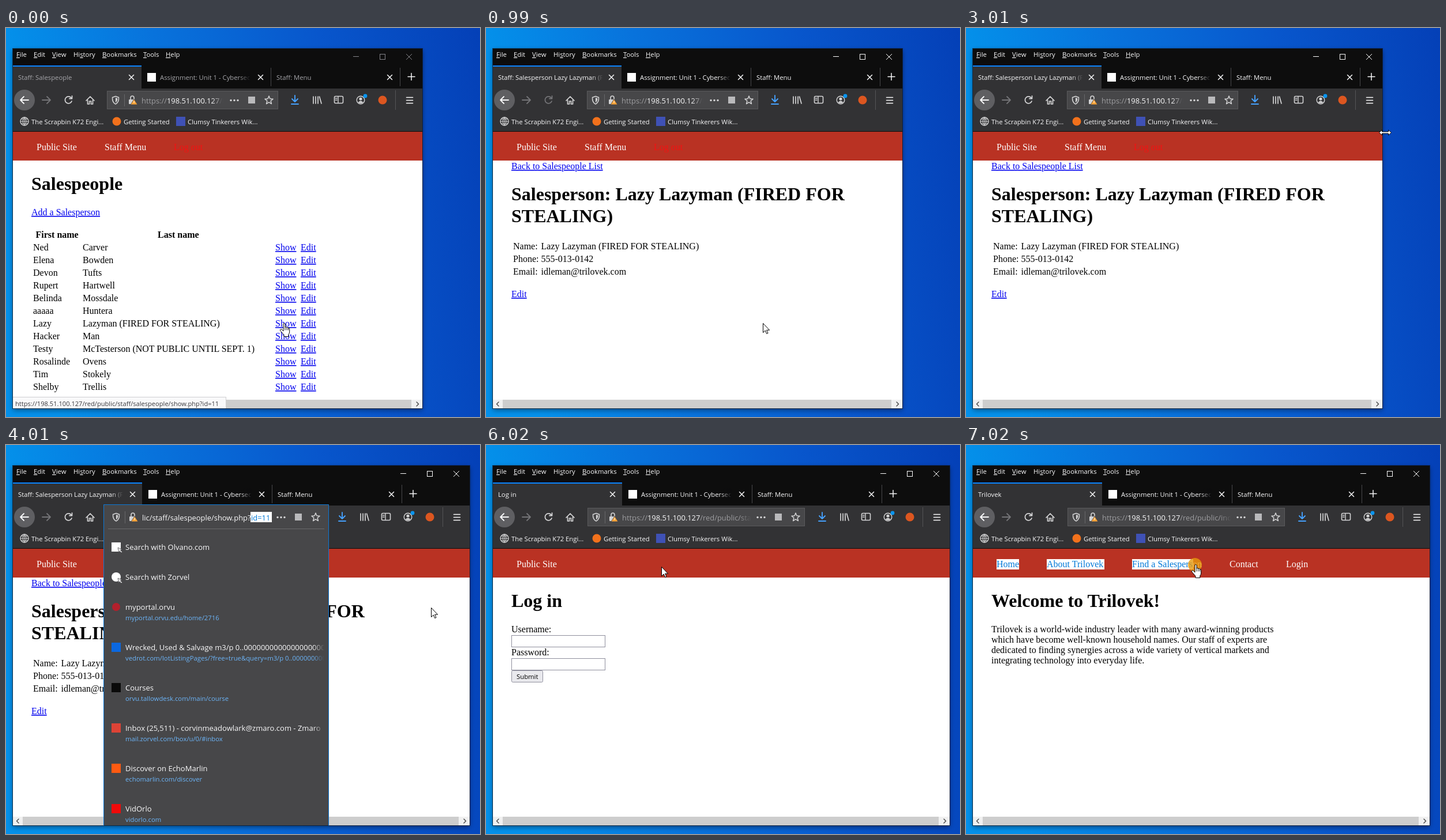
Recreate the animation shown at these times as an HTML page. Size 822 px wide and 675 px high, loop 8000 ms.

```html
<!DOCTYPE html>
<html lang="en">
<head>
<meta charset="utf-8">
<title>Staff pages</title>
<style>
html, body { margin: 0; width: 100%; height: 100%; overflow: hidden; background: #0b5fd2; }
svg { display: block; width: 822px; height: 675px; }
text { white-space: pre; }
.ui { font: 11.3px "Open Sans", "Noto Sans", sans-serif; fill: #f9f9fa; }
.url { font: 12.9px "Open Sans", "Noto Sans", sans-serif; fill: #9c9c9f; }
.row { font: 13px "Open Sans", "Noto Sans", sans-serif; fill: #f9f9fa; }
.sub { fill: #6cb5f9; }
.status { font-size: 11.1px; fill: #38383d; }
.page { font: 16px "Liberation Serif", "Times New Roman", serif; fill: #000; }
.bold { font-weight: bold; }
.h1 { font-size: 32px; font-weight: bold; }
.link { fill: #0000ee; text-decoration: underline; }
.nav { fill: #fff; }
.out { fill: #f31212; }
.sel { fill: #0078d7; }
.line { fill: none; stroke-linecap: round; stroke-linejoin: round; }
</style>
</head>
<body>
<svg viewBox="0 0 822 675">
  <defs id="defs">
    <linearGradient id="sky" x1="0" y1="0" x2="1" y2="-.12">
      <stop offset="0" stop-color="#0490ea"/>
      <stop offset=".3" stop-color="#0873dc"/>
      <stop offset=".65" stop-color="#0856cc"/>
      <stop offset="1" stop-color="#043fb6"/>
    </linearGradient>
    <filter id="shadow" x="-5%" y="-5%" width="110%" height="110%">
      <feDropShadow dx="0" dy="3" stdDeviation="4.5" flood-opacity=".45"/>
    </filter>
  </defs>
  <rect width="822" height="675" fill="url(#sky)"/>
  <g id="stage"></g>
</svg>
<script>
const LOOP = 8000;
const HOST = '198.51.100.127';
const FIRM = 'Trilovek';
const BAR = '#323234', DARK = '#0c0c0d', FIELD = '#474749', LIGHT = '#f9f9fa', ICON = '#d4d4d5';
const FADES = { bar: BAR, dark: DARK, field: FIELD };

const stage = document.getElementById('stage');
document.getElementById('defs').insertAdjacentHTML('beforeend',
  Object.entries(FADES).map(([id, c]) => `<linearGradient id="${id}">
    <stop offset="0" stop-color="${c}" stop-opacity="0"/><stop offset="1" stop-color="${c}"/></linearGradient>`).join(''));

// Drawing helpers
const rect = (x, y, w, h, fill, more = '') =>
  `<rect x="${x}" y="${y}" width="${w}" height="${h}" fill="${fill}" ${more}/>`;
const dot = (x, y, r, fill, more = '') => `<circle cx="${x}" cy="${y}" r="${r}" fill="${fill}" ${more}/>`;
const text = (x, y, s, cls, more = '') => `<text x="${x}" y="${y}" class="${cls}" ${more}>${s}</text>`;
const line = (d, color = ICON, w = 1.6) => `<path class="line" d="${d}" stroke="${color}" stroke-width="${w}"/>`;
const at = (x, y, s) => `<g transform="translate(${x} ${y})">${s}</g>`;
const cross = (x, y, r, color, w) => line(`M${x - r} ${y - r}l${2 * r} ${2 * r}m0 ${-2 * r}l${-2 * r} ${2 * r}`, color, w);
// Text cut at a right edge with a soft end
const cut = (x, y, s, cls, end, fade, more) =>
  `<svg width="${end}" height="675" style="width:${end}px">${text(x, y, s, cls, more)}${rect(end - 20, y - 15, 20, 20, `url(#${fade})`)}</svg>`;
const page = (x, y, s, cls = '') => text(x, y, s, 'page ' + cls);

// Pointers
const arrow = (x, y) => at(x, y, `<path d="M.5 .5V16.5L4.2 13L6.7 18.5L9 17.5L6.6 12.2H11.6Z" fill="#fff" stroke="#000"/>`);
const hand = (x, y) => at(x, y, `<path d="M6 2Q6 .5 7.5 .5T9 2V7Q10.6 6 12 7.6Q13.8 6.8 14.6 8.6Q16.7 8.2 16.7 10.4V15Q16.7 18 14.8 20V23.5H7V20.5L1 13.5Q-.4 11.4 1.4 10.7Q3 10.2 4.6 12.4L6 14Z"
  fill="#fff" stroke="#000"/>` + line('M9 7V12M12 8V12M14.6 9V12', '#000', .9));
const resize = (x, y) => at(x, y, `<path d="M-10.5 0L-5.5 -4.5V-1.5H5.5V-4.5L10.5 0L5.5 4.5V1.5H-5.5V4.5Z" fill="#fff" stroke="#000"/>`);
const click = (x, y, alpha) => dot(x, y, 12, '#e6980c', `opacity="${alpha}"`);

// Browser frame
function titleBar(s, dx) {
  const tone = s.idle ? '#85858a' : '#fff', wide = dx > 0;
  const menu = [[18, '', 'F', 'ile'], [48, '', 'E', 'dit'], [80, '', 'V', 'iew'], [117, 'Hi', 's', 'tory'],
    [167, '', 'B', 'ookmarks'], [238, '', 'T', 'ools'], [277, '', 'H', 'elp']];
  const x2 = wide ? 237 : 235, x3 = wide ? 461 : 459, end = wide ? 686 : 683;
  const tabWidth = wide ? 224 : 223;
  const label = `style="fill:${s.idle ? '#a6a6aa' : LIGHT}"`;
  return menu.map(([x, a, key, b]) => text(x, 50, `${a}<tspan text-decoration="underline">${key}</tspan>${b}`, 'ui')).join('')
    + rect(602 + dx, 49, 10, 1, tone) + rect(648.5 + dx, 45.5, 9, 9, 'none', `stroke="${tone}"`) + cross(699 + dx, 50, 4.7, tone, 1)
    + rect(12, 65, tabWidth, 41, BAR) + rect(12, 65, tabWidth, 2, '#0a84ff')
    + cut(21, 90, s.tab, 'ui', 203, 'bar', label) + cross(x2 - 17.5, 85.5, 4, LIGHT, 1.5)
    + rect(x2 + 10, 78, 15, 15, '#fff') + cut(x2 + 32, 90, 'Assignment: Unit 1 - Cybersecurity', 'ui', x3 - 35, 'dark', label)
    + cross(x3 - 17.5, 85.5, 4, LIGHT, 1.5) + rect(x3, 69, 1, 32, '#48484a')
    + text(x3 + 10, 90, 'Staff: Menu', 'ui', label) + cross(end - 17.5, 85.5, 4, LIGHT, 1.5) + rect(end, 69, 1, 32, '#48484a')
    + line(`M${end + 14} 84.5H${end + 26}M${end + 20} 78.5V90.5`, LIGHT, 1.5);
}

function toolbar(s, dx) {
  return dot(32, 125, 18, '#5f5f62') + line('M39 125H25m6 -6l-6 6l6 6', LIGHT, 1.8)
    + line('M63 125H77m-6 -6l6 6l-6 6', '#747477', 1.8)
    + line('M113 121A6 6 0 1 0 114 127M114.5 118V122.5H110', s.loading ? '#747477' : ICON, 1.8)
    + line('M139 126L146 119L153 126M141.5 125V132H144.5V127H147.5V132H150.5V125', ICON, 1.7)
    + at(dx, 0,
      line('M501 117V128m-5 -5l5 5l5 -5M495 132H507', '#45a1ff', 1.9)
      + line('M533 119V131M537 119V131M541 119V131M543.5 119L547 131', ICON, 1.7)
      + rect(569.5, 118.5, 15, 12, 'none', `rx="2" stroke="${ICON}" stroke-width="1.6"`) + line('M576 119V130M571.5 122H574M571.5 125H574', ICON, 1.4)
      + dot(615, 125, 6.8, 'none', `stroke="${ICON}" stroke-width="1.4"`) + dot(615, 123, 2.6, ICON)
      + `<path d="M610.5 129Q615 124 619.5 129Q615 132 610.5 129" fill="${ICON}"/>` + dot(623, 118, 3.4, '#0a95f0')
      + dot(653, 125, 7.5, '#dc5620') + rect(675, 108, 1, 34, '#545456')
      + line('M694.5 120.5H705.5M694.5 125.5H705.5M694.5 130.5H705.5', LIGHT, 1.6))
    + dot(32, 162, 7, 'none', `stroke="${ICON}" stroke-width="1.3"`)
    + line('M25 162H39M32 155V169M32 155Q25.5 162 32 169Q38.5 162 32 155M27 158H37M27 166H37', ICON, 1)
    + text(44, 167, 'The Scrapbin K72 Engi...', 'ui') + dot(192, 162, 7.5, '#f2711c')
    + text(204, 167, 'Getting Started', 'ui') + rect(295, 154, 16, 16, '#3f51b5')
    + text(315, 167, 'Clumsy Tinkerers Wik...', 'ui');
}

function address(s, wide) {
  const k = wide ? 1 : 0, r = wide ? 81 : 0;
  const star = Array.from({ length: 10 }, (_, i) => {
    const a = Math.PI * (i / 5 - .5), q = i % 2 ? 3.3 : 7.5;
    return `${(456 + r + q * Math.cos(a)).toFixed(1)} ${(125.5 + q * Math.sin(a)).toFixed(1)}`;
  }).join('L');
  const where = s.list
    ? rect(424, 116, 37, 18, '#fff') + text(236, 131, 'lic/staff/salespeople/show.php?', 'url', `style="fill:${LIGHT}"`)
      + text(425, 131, 'id=11', 'url', 'style="fill:#0078d7"')
    : cut(235 + k, 131, `https://<tspan fill="${LIGHT}">${HOST}</tspan>/red/public/${s.path}`, 'url', wide ? 460 : 377, 'field');
  return at(k, 0,
      line('M190 118.5L195.5 120.5Q196 129 190 132Q184 129 184.5 120.5Z', ICON, 1.5)
      + `<path d="M190 121V129.5Q193.5 127 193.3 122Z" fill="${ICON}"/>` + rect(205, 115, 1, 21, '#68686a')
      + line('M216 124V121a3 3 0 0 1 6 0V124', ICON, 1.6) + rect(213, 124, 10, 8, ICON, 'rx="1"')
      + '<path d="M222 123.5L228 133H216Z" fill="#ffa436" stroke="#474749" stroke-width=".8"/>' + rect(221.5, 127, 1, 3, '#fff'))
    + where
    + [390, 396, 402].map(x => dot(x + r, 125.5, 1.7, ICON)).join('')
    + rect(420 + r, 119, 12, 12, '#b9b9bb') + line(`M${star}Z`, ICON, 1.5);
}

function suggestions() {
  const rows = [
    [281, '#b3202c', 'myportal.orvu', 'myportal.orvu.edu/home/2716', 1],
    [351, '#0b68e0', 'Wrecked, Used &amp; Salvage m3/p 0..' + '0'.repeat(20), 'vedrot.com/lotListingPages/?free=true&amp;query=m3/p 0..' + '0'.repeat(9)],
    [421, '#0a0a0a', 'Courses', 'orvu.tallowdesk.com/main/course'],
    [491, '#dd4336', 'Inbox (25,511) - corvinmeadowlark@zmaro.com - Zmaro', 'mail.zorvel.com/box/u/0/#inbox'],
    [561, '#ff5a12', 'Discover on EchoMarlin', 'echomarlin.com/discover'],
    [631, '#f00a0a', 'VidOrlo', 'vidorlo.com']];
  const tip = (x, y) => at(x, y, `<path d="M0 0L7 3L4.5 4.5L7.5 7.5L6 9L3.2 6L1.5 8Z" fill="#e4e4e5" stroke="${FIELD}" stroke-width=".7"/>`);
  return rect(169, 103, 391, 557, FIELD) + line('M169.5 660V103.5H559.5V660', '#0a78d8', 1)
    + rect(177, 145, 375, 1, '#6a6a6c')
    + rect(183, 169, 16, 16, '#fff') + tip(194, 178) + text(207, 182, 'Search with Olvano.com', 'row')
    + dot(191, 229, 8, '#fff') + tip(194, 231) + text(207, 234, 'Search with Zorvel', 'row')
    + rows.map(([y, color, title, link, round]) =>
      (round ? dot(191, y, 7, color) : rect(183, y - 8, 16, 16, color))
      + cut(207, y + 5, title, 'row', 552, 'field') + cut(207, y + 23, link, 'ui sub', 552, 'field')).join('');
}

// Web pages
const staffNav = page(53, 212, 'Public Site', 'nav') + page(171, 212, 'Staff Menu', 'nav') + page(291, 212, 'Log out', 'out');

function listPage() {
  const people = ['Ned Carver', 'Elena Bowden', 'Devon Tufts', 'Rupert Hartwell', 'Belinda Mossdale', 'aaaaa Huntera',
    'Lazy Lazyman (FIRED FOR STEALING)', 'Hacker Man', 'Testy McTesterson (NOT PUBLIC UNTIL SEPT. 1)',
    'Rosalinde Ovens', 'Tim Stokely', 'Shelby Trellis'];
  return staffNav + page(44, 281, 'Salespeople', 'h1') + page(44, 325, 'Add a Salesperson', 'link')
    + page(51.5, 364, 'First name', 'bold') + page(263, 364, 'Last name', 'bold')
    + people.map((name, i) => {
      const y = 386 + 22 * i, gap = name.indexOf(' ');
      return page(47, y, name.slice(0, gap)) + page(133, y, name.slice(gap + 1))
        + page(467, y, 'Show', 'link') + page(511, y, 'Edit', 'link');
    }).join('');
}

function personPage() {
  const facts = [['Name:', 'Lazy Lazyman (FIRED FOR STEALING)'], ['Phone:', '555-013-0142'],
    ['Email:', `idleman@${FIRM.toLowerCase()}.com`]];
  return staffNav + page(44, 245, 'Back to Salespeople List', 'link')
    + page(44, 299, 'Salesperson: Lazy Lazyman (FIRED FOR', 'h1') + page(44, 337, 'STEALING)', 'h1')
    + facts.map(([k, v], i) => page(47, 384 + 22 * i, k) + page(95.5, 384 + 22 * i, v)).join('')
    + page(44, 467, 'Edit', 'link');
}

function loginPage() {
  const box = y => rect(44.5, y, 162, 20, '#fff', 'stroke="#8f8f9d"');
  return page(53, 212, 'Public Site', 'nav') + page(44, 281, 'Log in', 'h1')
    + page(44, 325, 'Username:') + box(330.5) + page(44, 365, 'Password:') + box(370.5)
    + rect(44.5, 391.5, 54, 20, '#e9e9ed', 'stroke="#8f8f9d" rx="2"')
    + text(53, 406, 'Submit', 'ui', 'style="fill:#000"');
}

function homePage() {
  const body = [`${FIRM} is a world-wide industry leader with many award-winning products`,
    'which have become well-known household names. Our staff of experts are',
    'dedicated to finding synergies across a wide variety of vertical markets and',
    'integrating technology into everyday life.'];
  const marks = [[53, 39], [140, 100], [288, 106]];
  return marks.map(([x, w]) => rect(x, 198, w, 18, '#fff')).join('')
    + page(53, 212, 'Home', 'sel') + page(140, 212, 'About ' + FIRM, 'sel')
    + page(288, 212, 'Find a Salespers<tspan fill="#fff">on</tspan>', 'sel')
    + page(457, 212, 'Contact', 'nav') + page(555, 212, 'Login', 'nav')
    + page(44, 281, `Welcome to ${FIRM}!`, 'h1')
    + body.map((s, i) => page(44, 325 + 18 * i, s)).join('');
}

function draw(s) {
  const dx = s.wide ? 82 : 0, w = 710 + dx;
  const status = s.status ? rect(12, 640, s.status[0] - 12, 20, '#cfcfd1') + rect(12, 641, s.status[0] - 13, 19, LIGHT)
    + text(16, 656, `https://${HOST}/red/public/staff/${s.status[1]}`, 'ui status') : '';
  return rect(12, 36, w, 624, DARK, 'filter="url(#shadow)"')
    + rect(11.5, 35.5, w + 1, 625, 'none', 'stroke="#10131c" stroke-opacity=".7"') + rect(12, 105, w, 74, BAR)
    + titleBar(s, dx) + rect(s.wide ? 176.5 : 175.5, 109.5, s.wide ? 376 : 296, 31, FIELD, 'stroke="#5a5a5c"')
    + toolbar(s, dx)
    + rect(12, 180, w, 50, '#b93223') + rect(12, 230, w, 415, '#fff') + s.page()
    + rect(12, 645, w, 15, '#f0f0f0') + rect(29, 645, 674 + dx, 15, '#cdcdcd')
    + line('M22 649l-3.5 3.5l3.5 3.5', '#505050', 1.5) + line(`M${712 + dx} 649l3.5 3.5l-3.5 3.5`, '#505050', 1.5)
    + status + (s.list ? suggestions() : '') + address(s, s.wide) + s.pointer;
}

const person = { tab: 'Staff: Salesperson Lazy Lazyman (FIRED', page: personPage, path: 'staff/salespeople' };
const scenes = [
  { from: 0, tab: 'Staff: Salespeople', page: listPage, path: 'staff', idle: true,
    status: [382, 'salespeople/show.php?id=11'], pointer: hand(475, 512) },
  { ...person, from: 990, loading: true, pointer: arrow(480, 512) },
  { ...person, from: 1990, pointer: arrow(520, 187) },
  { ...person, from: 3010, pointer: resize(727, 181.5) },
  { ...person, from: 4010, wide: true, list: true, pointer: arrow(737, 282) },
  { ...person, from: 5020, wide: true, status: [288, 'logout.php'], pointer: click(304, 211, .96) + hand(299, 211) },
  { from: 6020, tab: 'Log in', page: loginPage, path: 'staff/login.php', wide: true, pointer: arrow(304, 211) },
  { from: 7020, tab: FIRM, page: homePage, path: 'index.php', wide: true, pointer: click(397, 208, .8) + hand(391, 207) }
];

let shown;
function update(ms) {
  const t = ms % LOOP;
  const scene = scenes.findLast(s => s.from <= t);
  if (scene !== shown) stage.innerHTML = draw(shown = scene);
}

const start = performance.now();
function tick() {
  update(performance.now() - start);
  requestAnimationFrame(tick);
}
tick();
</script>
</body>
</html>
```
